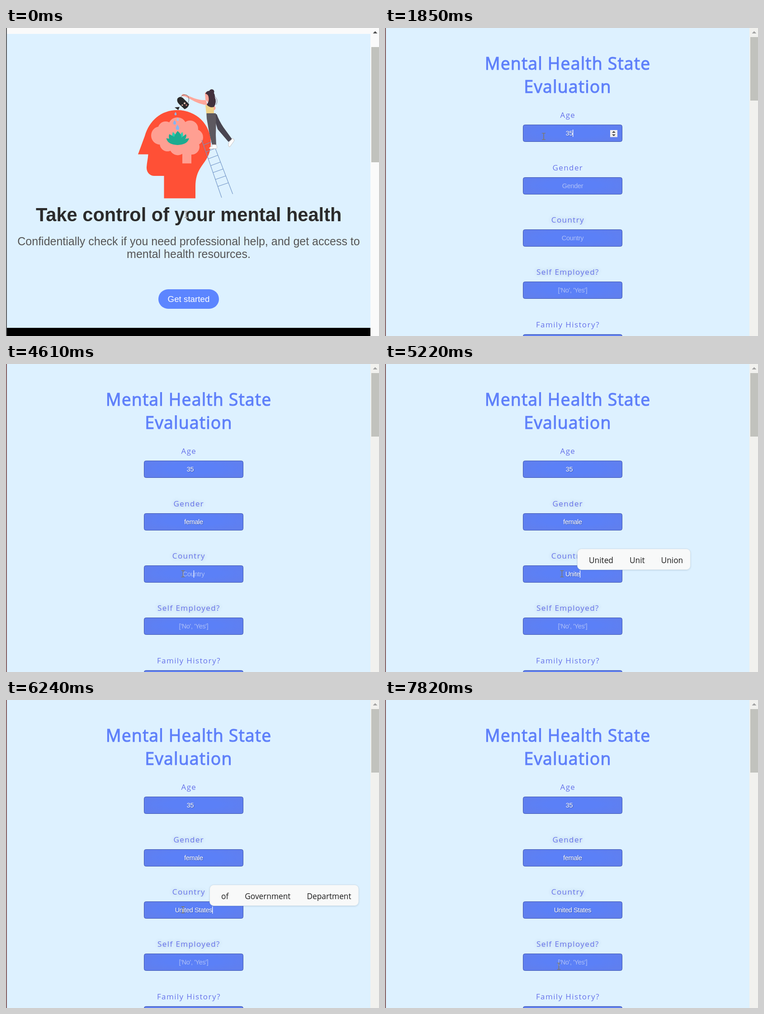
An HTML page that plays this animation: 825 by 679 pixels, repeating every 8000 ms.

```html
<!DOCTYPE html>
<html lang="en">
<head>
<meta charset="utf-8">
<title>Mental health check</title>
<style>
  html, body { margin: 0; width: 100%; height: 100%; overflow: hidden; background: #ddf1ff; }
  svg { display: block; width: 100%; height: 100%; }
  text { white-space: pre; }
  .mid { text-anchor: middle; }
  .arial { font-family: "Liberation Sans", Arial, sans-serif; }
  .open { font-family: "Open Sans", "Noto Sans", sans-serif; }
  .title { font-size: 37.5px; letter-spacing: 1.13px; fill: #5f80fa; stroke: #5f80fa; stroke-width: 1.1px; }
  .label { font-size: 17px; letter-spacing: 1.4px; fill: #6672ea; }
  .glow { text-shadow: 0 0 9px rgba(60, 90, 130, .32); }
  .value { font-size: 14.5px; letter-spacing: -.35px; fill: #fff; text-shadow: 1px 1px 1px rgba(0, 0, 0, .3); }
  .value.empty { fill: #adbff8; text-shadow: none; }
  .word { font-size: 17.3px; fill: #1c1c1c; }
</style>
</head>
<body>
<svg id="stage" viewBox="0 0 825 679" xmlns="http://www.w3.org/2000/svg">
  <defs>
    <radialGradient id="blue" cx=".5" cy=".45" r=".6">
      <stop offset=".45" stop-color="#5b80f7"/>
      <stop offset="1" stop-color="#607fee"/>
    </radialGradient>
    <filter id="soft" x="-10%" y="-30%" width="120%" height="170%">
      <feDropShadow dx="0" dy="1" stdDeviation="1.5" flood-color="#345" flood-opacity=".16"/>
    </filter>
  </defs>
  <rect width="825" height="679" fill="#ddf1ff"/>
  <g id="home"></g>
  <g id="form"></g>
  <g id="tip" class="open"></g>
  <g id="popup" class="open"></g>
  <g id="beam" fill="none" stroke-width="1.2">
    <path id="halo" stroke="#fff" stroke-width="3" opacity=".7" d="M-4-7H4M-4 7H4M0-7V7"/>
    <path id="ibar" d="M-4-7H4M-4 7H4M0-7V7"/>
  </g>
  <path id="arrow" d="M0 0V16L3.8 12.4L6.3 18L8.8 17L6.4 11.5H11.5Z" fill="#fff" stroke="#111"/>
</svg>
<script>
const LOOP = 8000, PAGE_SWITCH = 400;
const $ = id => document.getElementById(id);
const show = (el, on) => el.setAttribute('display', on ? 'inline' : 'none');

const shape = (d, fill, extra = '') => `<path d="${d}" fill="${fill}" ${extra}/>`;
const line = (d, color, w = 1) => `<path d="${d}" fill="none" stroke="${color}" stroke-width="${w}"/>`;
const rect = (x, y, w, h, fill, extra = '') =>
  `<rect x="${x}" y="${y}" width="${w}" height="${h}" fill="${fill}" ${extra}/>`;
const disc = (x, y, r, fill) => `<circle cx="${x}" cy="${y}" r="${r}" fill="${fill}"/>`;
const text = (x, y, cls, s, extra = '') => `<text x="${x}" y="${y}" class="${cls}" ${extra}>${s}</text>`;

const scrollbar = (bg, arrow, top, height) =>
  rect(806, 0, 19, 679, bg) + shape('M811.5 12L816.5 7L821.5 12Z', arrow) +
  rect(808, top, 17, height, '#c1c2bd');

// Landing page
function ladder() {
  let d = 'M433 247L477 374M457 250L501.5 366';
  for (let i = 0; i < 7; i++) {
    const y = 258 + 15.2 * i, y2 = y - 8;
    d += `M${433 + (y - 247) * .3465} ${y}L${457 + (y2 - 250) * .383} ${y2}`;
  }
  return line(d, '#6f93c6', 1.1);
}

function brain() {
  const lobes = [[341, 237, 20], [353, 223, 17], [379, 217, 20], [407, 222, 18],
    [418, 241, 18], [411, 262, 17], [380, 262, 18.5], [357, 255, 17]];
  return lobes.map(l => disc(...l, '#ff9f92')).join('') +
    rect(355, 215, 55, 52, '#ff9f92') + rect(390, 260, 20, 38.5, '#ff9f92');
}

function lotus() {
  const petal = (x, y, w, fill) => {
    const mx = (x + 379.5) / 2, my = (y + 258) / 2;
    return shape(`M379.5 258Q${mx - w} ${my + w * .35} ${x} ${y}Q${mx + w} ${my - w * .1} 379.5 258Z`, fill);
  };
  const teal = '#1eab90', mint = '#27d0b1';
  return petal(369, 229, 11, mint) + petal(390, 229, 11, mint) +
    petal(361, 234, 14, teal) + petal(398, 234, 14, teal) + petal(379.5, 227, 17, teal) +
    shape('M354.5 243Q367 244 379.5 254Q392 244 405 243Q402 257 379.5 258Q357 257 354.5 243Z', teal);
}

const drop = (x, y, r, fill) =>
  shape(`M${x} ${y - r * 1.9}Q${x + r * 1.2} ${y - r * .2} ${x + r} ${y + r * .3}` +
    `A${r} ${r} 0 0 1 ${x - r} ${y + r * .3}Q${x - r * 1.2} ${y - r * .2} ${x} ${y - r * 1.9}Z`, fill);

function woman() {
  const skin = '#ffa79b', hair = '#41303d', shoe = 'stroke="#b9a9a5" stroke-width=".7"';
  return shape('M458 190L466 190Q471 204 481 219L500 245L492 251L468 223Z', '#494550') +
    shape('M443.5 188H464Q465 215 464 235L465 258H456Q449 232 446 211Q443 198 443.5 188Z', '#5d5960') +
    shape('M493 252L501 243Q507 247 503 251L495 262Q490 262 493 252Z', '#fff', shoe) +
    shape('M456 257H464Q469 263 465 266L449 266Q450 262 456 261Z', '#fff', shoe) +
    shape('M455 168Q467 174 462 180L454 187L452 181Z', skin) +
    shape('M441 170L459 168L460 188H443Z', '#f0d287') +
    shape('M388 150Q389 144 395 146L409 152Q427 160 442 159L446 170Q428 169 408 157L396 151Z', skin) +
    shape('M440 143Q447 138 453 145L452 158L447 164L441 158Z', skin) +
    disc(455, 140.5, 5.5, hair) +
    shape('M441 145Q444 137 453 139Q463 142 462 153Q467 163 460 174Q451 177 444 169Q450 162 448 152Q447 146 441 145Z', hair) +
    line('M462 151Q470 158 465 169', '#6b5b68', .8) +
    line('M386 153Q391 145 400 148Q407 153 403 165', '#555', .9) +
    shape('M379 156Q384 149 391 154L405 168Q403 176 395 179L383 168Q377 162 379 156Z', '#2b2a2b') +
    shape('M373 175L384 174L381 181Z', '#2b2a2b') +
    disc(395, 166, 2, '#f5c9b8') + disc(390, 170, 1.6, '#f5c9b8') + disc(399, 170, 1.6, '#e9837a');
}

$('home').innerHTML =
  rect(0, 0, 806, 13, '#fafafa') + rect(0, 661, 806, 18, '#000') +
  scrollbar('#fafafa', '#4c4c4c', 42, 254) + rect(0, 0, 2, 679, '#5f6062') +
  shape('M349.5 375.5V326H328C318 326 310.5 318 311 307C311.5 297 314 288 314.5 278.5H292L307 238' +
    'C317 204 343 181 379 181C421 181 453 213 453 253C453 280 441 292 431 307C423 319 419 332 419 349V375.5Z', '#ff5036') +
  brain() + lotus() +
  drop(375, 189.5, 2.3, '#8fb6ea') + drop(380, 202, 2.3, '#a9bfe8') +
  drop(373, 209, 3, '#86b2ee') + drop(379.3, 220, 3.7, '#86b8f2') +
  ladder() + woman() +
  text(404.2, 426, 'arial mid', 'Take control of your mental health', 'font-size="41.6" font-weight="700" fill="#2b2b2b"') +
  text(404, 478.5, 'arial mid', 'Confidentially check if you need professional help, and get access to', 'font-size="25" fill="#555"') +
  text(404, 507.3, 'arial mid', 'mental health resources.', 'font-size="25" fill="#555"') +
  rect(337, 576, 134, 43, '#5c85ff', 'rx="21.5"') +
  text(404, 603.5, 'arial mid', 'Get started', 'font-size="18.75" fill="#fff"');

// Questionnaire
const rows = [
  { label: 'Age', hint: 'Age', cx: 407.5 },
  { label: 'Gender', hint: 'Gender', cx: 415 },
  { label: 'Country', hint: 'Country', cx: 415 },
  { label: 'Self Employed?', hint: "['No', 'Yes']", cx: 415 },
  { label: 'Family History?', hint: '', cx: 415 }
];
rows.forEach((r, i) => r.top = Math.round(213.2 + 115.4 * i));

$('form').innerHTML =
  scrollbar('#f1f1ee', '#a2a2a2', 20, 140) + rect(0, 0, 2, 679, '#835f60') +
  text(404, 91.5, 'open mid title', 'Mental Health State') +
  text(404, 142.5, 'open mid title', 'Evaluation') +
  rows.map((r, i) =>
    text(404.4, r.top - 15.5, 'open mid label' + (i == 2 || i == 3 ? ' glow' : ''), r.label, `id="label${i}"`) +
    rect(305.5, r.top + .5, 219, 37, 'url(#blue)', 'rx="4" stroke="#3f56ae"') +
    text(r.cx, r.top + 24, 'arial mid value', '', `id="value${i}"`)).join('') +
  `<g id="spin">${rect(498, 225, 16, 15.5, '#efefef')}${shape('M502 231L506 227L510 231ZM502 234.5L506 238.5L510 234.5Z', '#444')}</g>` +
  rect(0, 0, 1.3, 16, '#fff', 'id="caret"');

$('tip').innerHTML = rect(.5, .5, 179, 22, '#fff', 'stroke="#a8a8a8"') +
  text(8, 16, '', 'Please fill out this field.', 'font-size="13" fill="#575757"');

// Typing: time, row, text, caret, suggestions, suggestion left edge
const kingdom = 'States Kingdom Arab', nations = 'States Kingdom Nations', unit = 'United Unit Union';
const keys = [
  [1280, 0, '', 1], [1610, 0, '', 0], [1770, 0, '3', 1], [1850, 0, '35', 1],
  [2380, 0, '35', 0], [2830, 0, '35', 1], [2990, 0, '35', 0],
  [3170, 1, '', 1], [3500, 1, '', 0], [3580, 1, 'f', 1], [3660, 1, 'fe', 1],
  [3760, 1, 'fem', 1], [3850, 1, 'fema', 1], [3950, 1, 'female', 1],
  [4130, 1, 'female', 1, 'and voice friend', 433], [4370, 1, 'female', 0],
  [4610, 2, '', 1], [4870, 2, 'U', 1], [4950, 2, 'Un', 1], [5030, 2, 'Uni', 1, unit, 419],
  [5120, 2, 'Unit', 1, unit, 421], [5200, 2, 'Unite', 1, unit, 425], [5300, 2, 'United', 1, nations, 429],
  [5480, 2, 'United ', 1, nations, 430], [5640, 2, 'United S', 1, kingdom, 433],
  [5800, 2, 'United St', 1, kingdom, 437], [5900, 2, 'United Sta', 1, kingdom, 441],
  [5980, 2, 'United Stat', 1, kingdom, 445], [6060, 2, 'United State', 1, kingdom, 447],
  [6140, 2, 'United States', 1, kingdom, 450], [6240, 2, 'United States', 1, 'of Government Department', 450],
  [6560, 2, 'United States', 1], [6740, 2, 'United States', 0],
  [6900, 3, '', 1], [7240, 3, 'Y', 1], [7340, 3, 'Y', 1, 'You Yes Yeah', 413],
  [7500, 3, 'Ye', 1, 'You Yes Yeah', 413], [7580, 3, 'Ye', 1, 'Yes Yeah Yet', 418],
  [7740, 3, 'Y', 1, 'You Yes Yeah', 413], [7820, 3, '', 0]
];

// Pointer: time, x, y
const moves = [
  [0, 398, 411], [80, 398, 411], [300, 386, 590], [420, 385, 588], [900, 385, 588],
  [1000, 325, 465], [1100, 276, 300], [1200, 322, 245], [1280, 351, 239], [2270, 351, 239],
  [2500, 391.5, 343.5], [4290, 391.5, 343.5], [4520, 391.5, 462.5], [6480, 391.5, 462.5],
  [6640, 372, 520], [6820, 384.5, 587], [LOOP, 384.5, 587]
];

const pen = document.createElement('canvas').getContext('2d');
function measure(s, font, spacing = 0) {
  pen.font = font;
  return pen.measureText(s).width + spacing * s.length;
}

function pointerAt(t) {
  const i = Math.max(1, moves.findIndex(m => m[0] > t));
  const [t0, x0, y0] = moves[i - 1], [t1, x1, y1] = moves[i];
  const k = (t - t0) / (t1 - t0);
  return [x0 + (x1 - x0) * k, y0 + (y1 - y0) * k];
}

function drawPopup(words, x, top) {
  let w = 26;
  const labels = words.split(' ').map(s => {
    const el = text(w, 31.5, 'word', s);
    w += measure(s, '17.3px "Open Sans", "Noto Sans", sans-serif') + 36;
    return el;
  });
  w -= 19;
  $('popup').innerHTML = rect(.5, .5, w - 1, 46, '#f8f9f9', 'rx="9" stroke="#cfe0ea" filter="url(#soft)"') + labels.join('');
  $('popup').setAttribute('transform', `translate(${x} ${top - 37})`);
}

let lastKey = null;
function drawFields(t) {
  const past = keys.filter(k => k[0] <= t), key = past[past.length - 1];
  if (key === lastKey) return;
  lastKey = key;
  rows.forEach((r, i) => {
    const k = past.filter(p => p[1] == i).pop(), s = k ? k[2] : '';
    const el = $('value' + i);
    el.textContent = s || r.hint;
    el.classList.toggle('empty', !s);
  });
  show($('caret'), key && key[3]);
  show($('popup'), key && key[4]);
  if (!key) return;
  const [, row, s, , words, x] = key, r = rows[row];
  const w = measure(s, '14.5px "Liberation Sans", Arial, sans-serif', -.35);
  $('caret').setAttribute('x', r.cx + w / 2 - .2);
  $('caret').setAttribute('y', r.top + 11);
  if (words) drawPopup(words, x, r.top);
}

function draw(t) {
  const onForm = t >= PAGE_SWITCH;
  show($('home'), !onForm);
  show($('form'), onForm);
  drawFields(t);
  show($('spin'), t >= 1190 && t < 3170);
  $('label1').classList.toggle('glow', t >= 2500);

  const [x, y] = pointerAt(t);
  const overField = x > 305 && x < 525 && rows.some(r => y > r.top && y < r.top + 38);
  const beam = onForm ? overField : y < 515;
  show($('beam'), beam);
  show($('arrow'), !beam);
  show($('halo'), !onForm);
  $('ibar').setAttribute('stroke', onForm ? '#857746' : '#777');
  for (const id of ['beam', 'arrow']) $(id).setAttribute('transform', `translate(${x} ${y})`);

  const tipAt = t >= 780 && t < 900 ? [396, 614] : t >= 2830 && t < 2990 ? [402, 371] : null;
  show($('tip'), tipAt);
  if (tipAt) $('tip').setAttribute('transform', `translate(${tipAt})`);
}

function tick() {
  draw(performance.now() % LOOP);
  requestAnimationFrame(tick);
}
tick();
</script>
</body>
</html>
```
